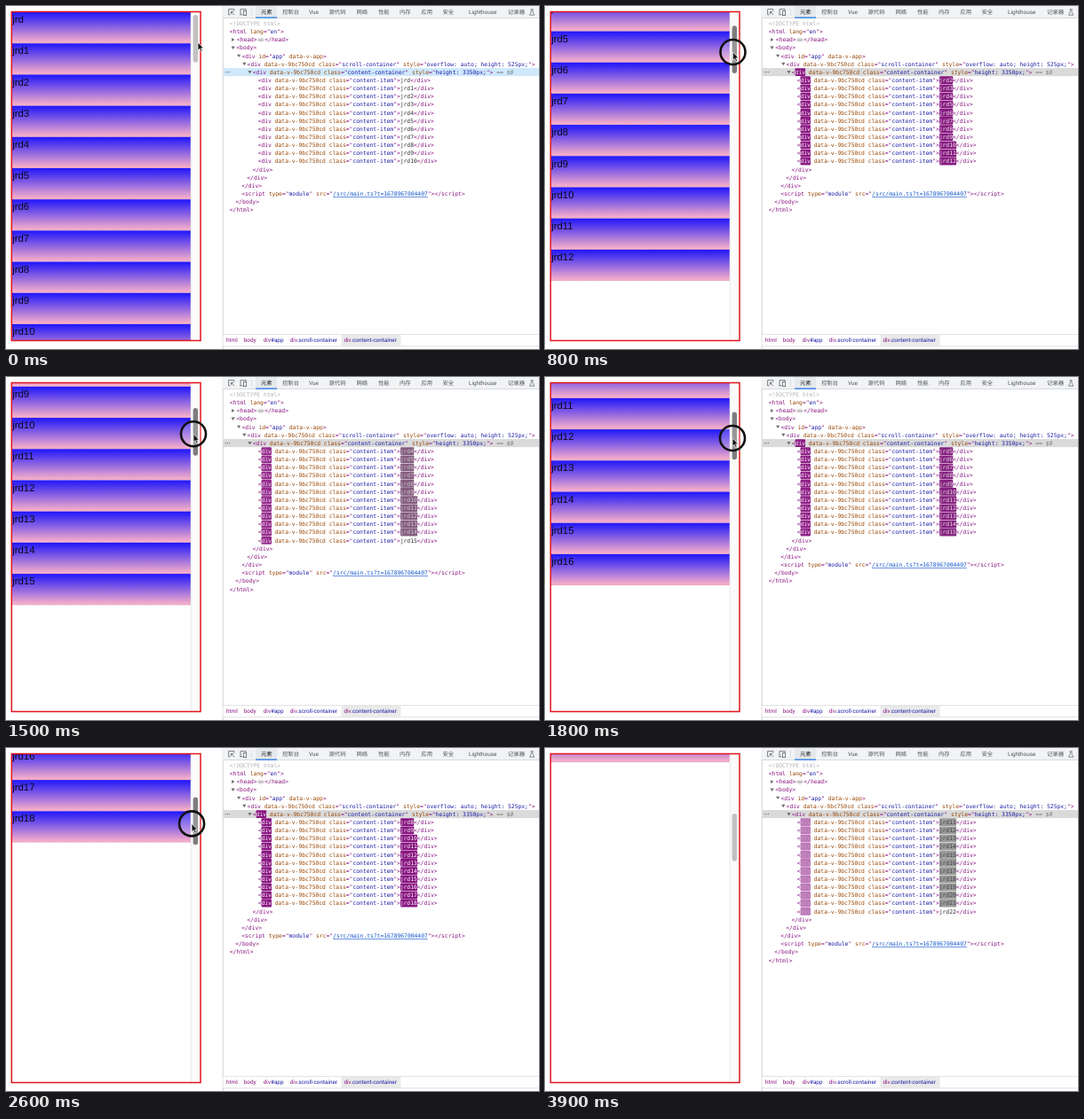
These frames come from a looping animation (600 by 387 pixels, 4 s). An HTML page:

```html
<!DOCTYPE html>
<html lang="en">
<head>
<meta charset="utf-8">
<style>
html, body { margin: 0; width: 100%; height: 100%; overflow: hidden; background: #fff; }
svg { display: block; width: 600px; height: 387px; }
text { white-space: pre; text-rendering: geometricPrecision; }
.code { font: 6.34px "DejaVu Sans Mono", monospace; fill: #881280; }
.item { font: 11.4px "Liberation Sans", Arial, sans-serif; fill: #0c0a18; }
.ui { font: 6.35px Roboto, "Noto Sans CJK SC", "Noto Sans CJK", sans-serif; fill: #50545a; }
.n { fill: #994500; }
.v { fill: #1a1aa6; }
.t { fill: #2a2a2a; }
.link { fill: #1155cc; text-decoration: underline; }
.tag { fill: #881280; }
</style>
</head>
<body>
<svg id="stage" viewBox="0 0 600 387" xmlns="http://www.w3.org/2000/svg"></svg>
<script>
const LOOP = 4000, STEP = 100;
const ITEM = 35.2, TOP = 7;
const LINE = 9.15, CHAR = 3.817, ROW_X = 283.7, FIRST_ROW = 7;
const PRESS = 200, RELEASE = 3450, LEAVE = 3600;

// [time, scroll]
const scrollKeys = [[0, 0], [PRESS, 0], [500, 72.6], [1100, 236.4], [1800, 370.3],
  [2200, 436.5], [3100, 735.3], [3400, 800.6]];
// [time, x, y]
const pointerKeys = [[0, 216, 41], [PRESS, 212.5, 41.5], [500, 212, 46], [1100, 211, 58],
  [1800, 211, 69], [2200, 209.5, 74.5], [3100, 208.5, 99], [3400, 208, 104]];

function at(keys, t, col = 1) {
  const i = keys.findIndex(k => k[0] > t);
  if (i < 0) return keys[keys.length - 1][col];
  const a = keys[i - 1], b = keys[i];
  return a[col] + (b[col] - a[col]) * (t - a[0]) / (b[0] - a[0]);
}

const mix = (a, b, k) => `rgb(${a.map((c, i) => Math.round(c + (b[i] - c) * k))})`;
const clamp = x => Math.max(0, Math.min(1, x));
const label = i => 'jrd' + (i || '');
const lineY = i => 19.7 + LINE * i;

// Markup helpers
const esc = s => s.replace(/</g, '&lt;').replace(/>/g, '&gt;');
const span = (cls, s) => `<tspan class="${cls}">${esc(s)}</tspan>`;
const attr = (name, value) => ' ' + span('n', name) + '="' + span('v', value) + '"';
const code = (x, row, body) => `<text class="code" x="${x}" y="${lineY(row) + 2.2}">${body}</text>`;
const rect = (x, y, w, h, fill, more = '') =>
  `<rect x="${x}" y="${y}" width="${w}" height="${h}" fill="${fill}" ${more}/>`;
const ui = (x, y, s, more = '') => `<text class="ui" x="${x}" y="${y}" ${more}>${s}</text>`;
const arrow = (x, row, open = true) => {
  const y = lineY(row);
  return `<path fill="#6e6e6e" d="${open
    ? `M${x - 2} ${y - 1.6}h4.2l-2.1 3.4z`
    : `M${x - 1.4} ${y - 2.1}v4.2l3.3 -2.1z`}"/>`;
};
const div = (cls, style) => span('tag', '<') + '<tspan class="tag name">div</tspan>'
  + span('n', ' data-v-9bc750cd') + attr('class', cls)
  + (style ? attr('style', style) : '') + '&gt;';

function listView() {
  let s = '';
  for (let i = 0; i < 23; i++) {
    const y = TOP + i * ITEM;
    s += `<g class="cell">${rect(7, y, 201, ITEM, 'url(#shade)')}
      <path d="M7 ${y + ITEM - .4}H208" stroke="#3a1a90" stroke-opacity=".3" stroke-width=".6" stroke-dasharray="2 1.6"/>
      <text class="item" x="7.2" y="${y + 12.2}">${label(i)}</text></g>`;
  }
  return `<g clip-path="url(#port)"><g id="list">${s}</g></g>`
    + rect(208, 7, 11, 370, '#fbfbfb')
    + '<path d="M208.2 7V377" stroke="#e6e6e6" stroke-width=".8"/>'
    + rect(210.6, 10, 5.4, 53.6, '#c1c1c1', 'rx="2.7" id="thumb"')
    + '<rect x="6.3" y="6.5" width="212.7" height="371" fill="none" stroke="#e0141c" stroke-width="1.5"/>';
}

function toolbar() {
  const tabs = [[287, '元素'], [311, '控制台'], [341, 'Vue'], [363.5, '源代码'], [394.5, '网络'],
    [419, '性能'], [443, '内存'], [467.3, '应用'], [491.5, '安全'], [521, 'Lighthouse'], [565, '记录器']];
  return rect(244, 0, 356, 13.4, '#f1f3f4')
    + rect(281, 0, 24, 13.4, '#e6e9ec')
    + '<path d="M244 13.5H600" stroke="#cacdd1" stroke-width=".7"/>'
    + rect(281, 12.5, 24, 1.2, '#1a73e8')
    + `<g fill="none" stroke="#5f6368" stroke-width=".8">
        <path d="M252.5 9.8H250.6V3.6H256.8V5.6M253.4 6.4L257 10.2M253.4 9V6.4H256"/>
        <path d="M264 9.8V3.6H270.2V5M263.3 9.8H266.5"/><rect x="267.4" y="5.6" width="3.2" height="5"/>
        <path d="M590.6 3.8H593.6M591.3 3.8V6.4L589.5 10.2H594.7L592.9 6.4V3.8" stroke-width=".7"/>
        <path d="M276.4 3V11" stroke="#cacdd1" stroke-width=".6"/></g>`
    + tabs.map(([x, s], i) => ui(x, 9.3, s, i ? '' : 'style="fill:#202124"')).join('');
}

function tree() {
  const script = '<' + 'script', shut = '</' + 'script>';
  let rows = '';
  for (let i = 0; i < 12; i++) {
    const y = lineY(FIRST_ROW + i) - 4.4;
    rows += '<g class="row">'
      + rect(ROW_X + CHAR, y, 3 * CHAR, 8.7, '#881280', 'rx="1"')
      + rect(ROW_X + 42 * CHAR, y, 0, 8.7, '#881280', 'rx="1"')
      + code(ROW_X, FIRST_ROW + i, div('content-item') + '<tspan class="t label"></tspan>' + esc('</div>'))
      + '</g>';
  }
  const tail = code(277.5, 19, esc('</div>')) + code(271.3, 20, esc('</div>'))
    + code(265.2, 21, esc('</div>'))
    + code(265.2, 22, esc(script) + attr('type', 'module') + span('n', ' src') + '="'
      + span('link', '/src/main.ts?t=1678967004407') + '"' + esc('>' + shut))
    + code(258.3, 23, esc('</body>')) + code(251.8, 24, esc('</html>'));
  return rect(244.5, lineY(6) - 4.6, 355.5, LINE, '#cfe8fc', 'id="picked"')
    + code(251.8, 0, '<tspan style="fill:#b4b4b4">&lt;!DOCTYPE html&gt;</tspan>')
    + code(251.8, 1, esc('<html') + attr('lang', 'en') + '&gt;')
    + arrow(255.5, 2, false) + code(259.8, 2, esc('<head>'))
    + rect(283.4, lineY(2) - 2.3, 7, 5, '#e0e0e0', 'rx="2"')
    + [285, 287, 289].map(x => `<circle cx="${x - .1}" cy="${lineY(2) + .2}" r=".55" fill="#555"/>`).join('')
    + code(291.3, 2, esc('</head>'))
    + arrow(255.5, 3) + code(259.3, 3, esc('<body>'))
    + arrow(262, 4) + code(265.4, 4, esc('<div') + attr('id', 'app') + span('n', ' data-v-app') + '&gt;')
    + arrow(268.2, 5) + code(271.6, 5, div('scroll-container', 'overflow: auto; height: 525px;'))
    + [247.3, 249.4, 251.5].map(x => `<circle cx="${x}" cy="${lineY(6)}" r=".6" fill="#666"/>`).join('')
    + arrow(274.4, 6)
    + rect(277.8 + CHAR, lineY(6) - 4.4, 3 * CHAR, 8.7, '#881280', 'rx="1" id="boxFlash"')
    + `<g id="box">${code(277.8, 6, div('content-container', 'height: 3350px;')
      + '<tspan style="fill:#777"> == </tspan><tspan style="fill:#777;font-style:italic">$0</tspan>')}</g>`
    + rows + `<g id="tail">${tail}</g>`;
}

function crumbs() {
  const list = [[248, 'html'], [267.8, 'body'], [289.8, 'div', '#app'],
    [319.8, 'div', '.scroll-container'], [380.5, 'div', '.content-container']];
  return rect(244.5, 370.8, 355.5, 12.8, '#fff')
    + rect(377.5, 371, 67, 12.4, '#eaeaea')
    + '<path d="M244 370.6H600M244 383.8H600" stroke="#d5d5d5" stroke-width=".7"/>'
    + list.map(([x, a, b]) => ui(x, 379.2, span('tag', a) + (b ? span('v', b) : ''))).join('');
}

const stage = document.getElementById('stage');
stage.innerHTML = `<defs>
  <linearGradient id="shade" x1="0" y1="0" x2="0" y2="1">
    <stop offset="0" stop-color="#1f16fa"/><stop offset="1" stop-color="#ffb4c8"/>
  </linearGradient>
  <clipPath id="port"><rect x="7" y="7" width="201" height="370.5"/></clipPath></defs>`
  + rect(0, 0, 600, 387, '#fff') + listView()
  + '<path d="M244.2 0V387" stroke="#c8c8c8" stroke-width=".8"/>'
  + toolbar() + tree() + crumbs()
  + `<g id="pointer"><circle id="ring" r="14" fill="#fff" fill-opacity=".2" stroke="#111" stroke-width="2.6"/>
    <path d="M0 0V9.2L2.1 7.3L3.6 10.6L5.1 9.9L3.7 6.7H6.4Z" fill="#111" stroke="#fff" stroke-width=".7"/></g>`;

const $ = id => document.getElementById(id);
const cells = [...stage.querySelectorAll('.cell')];
const rows = [...stage.querySelectorAll('.row')].map(g => ({
  g, flashes: g.querySelectorAll('rect'),
  name: g.querySelector('.name'), label: g.querySelector('.label')
}));
const boxName = $('box').querySelector('.name');

// The inspector trails the page slightly.
function nodes(t) {
  const u = Math.max(0, at(scrollKeys, t) / (2 * ITEM) - .05);
  const first = Math.floor(u), last = Math.floor(u + 10.7);
  return { first, last, count: last - first + 1 };
}

function age(t, key) {
  const now = nodes(t)[key];
  let s = t;
  while (s > 0 && nodes(s)[key] === now) s -= 10;
  return t - s;
}

const PURPLE = [136, 18, 128], WHITE = [255, 255, 255], GREY = [132, 130, 132];

function flashName(bg, text, on, k) {
  bg.style.opacity = on ? 1 - k : 0;
  text.style.fill = on ? mix(WHITE, PURPLE, k) : '';
}

function draw(t) {
  const scroll = at(scrollKeys, t);
  const end = Math.floor(scroll / (2 * ITEM) + 10.75);
  $('list').setAttribute('transform', `translate(0 ${-scroll})`);
  cells.forEach((c, i) => { c.style.display = i <= end ? '' : 'none'; });

  const held = t >= PRESS && t < RELEASE;
  $('thumb').setAttribute('y', 10 + scroll * .08);
  $('thumb').setAttribute('fill', held ? '#7d7d7d' : '#c1c1c1');
  $('picked').setAttribute('fill', t < PRESS ? '#cfe8fc' : '#dadada');
  $('ring').style.display = held ? '' : 'none';
  $('pointer').style.display = t < LEAVE ? '' : 'none';
  $('pointer').setAttribute('transform', `translate(${at(pointerKeys, t)} ${at(pointerKeys, t, 2)})`);

  const { first, last, count } = nodes(t);
  const moved = first > 0, full = count === 12;
  const k = clamp(age(t, 'first') / 1400);
  const kEnd = clamp(age(t, 'last') / 1400);
  rows.forEach((r, i) => {
    r.g.style.display = i < count ? '' : 'none';
    const text = label(first + i);
    const added = full && i === count - 1;
    flashName(r.flashes[0], r.name, moved || added, moved ? k : kEnd);
    const lit = moved && !added;
    r.label.textContent = text;
    r.label.style.fill = lit ? mix(WHITE, [40, 36, 40], clamp(k * 2)) : '';
    r.flashes[1].setAttribute('width', text.length * CHAR);
    r.flashes[1].setAttribute('fill', mix(full ? [130, 76, 124] : PURPLE, GREY, clamp(k * 2.4)));
    r.flashes[1].style.opacity = lit ? 1 - k * k : 0;
  });
  flashName($('boxFlash'), boxName, moved && !full, k);
  $('tail').setAttribute('transform', `translate(0 ${(count - 12) * LINE})`);
}

const begin = performance.now();
function tick() {
  const t = (performance.now() - begin) % LOOP;
  draw(Math.floor(t / STEP) * STEP);
  requestAnimationFrame(tick);
}
tick();
</script>
</body>
</html>
```
